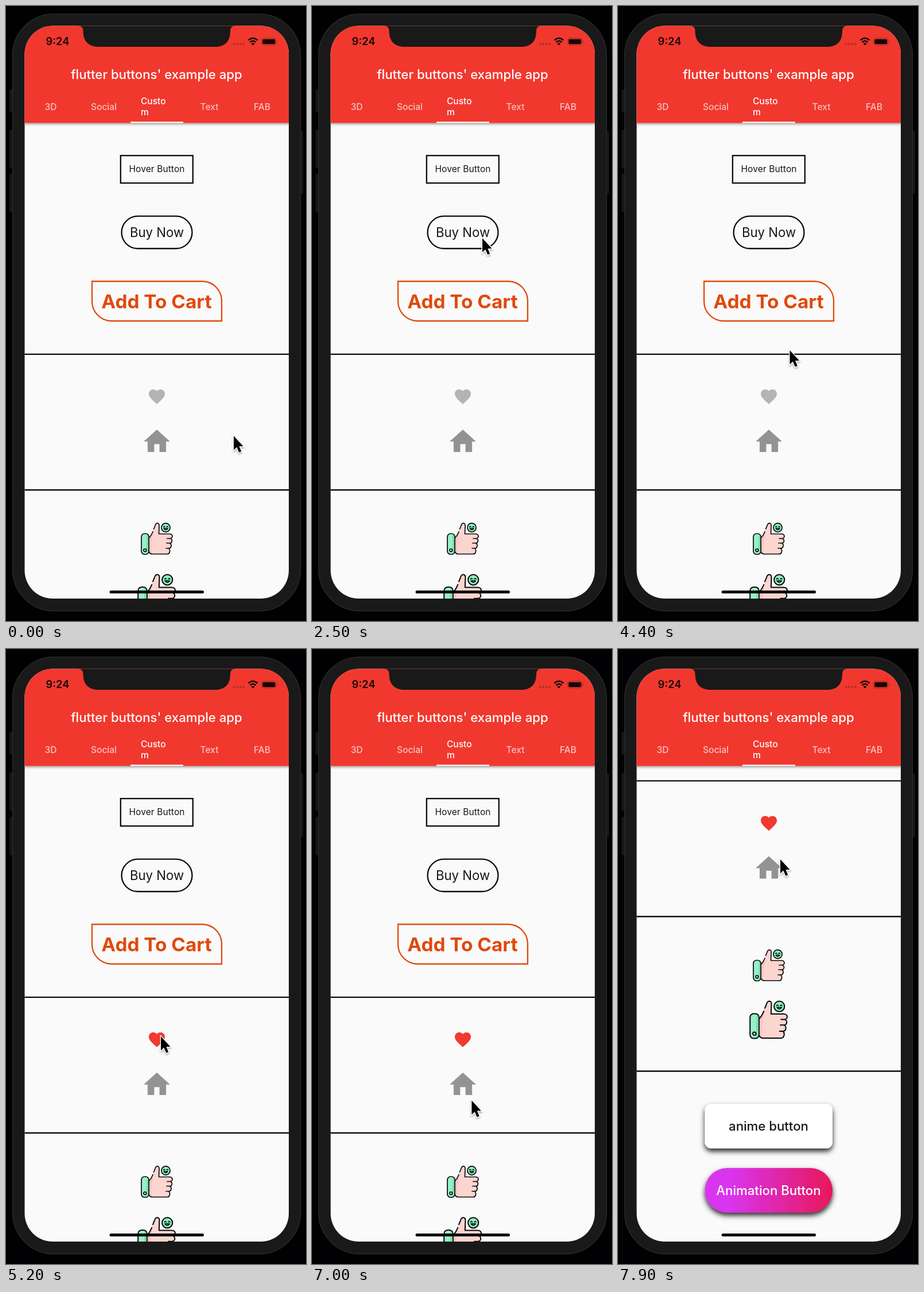
An HTML page for the animation above (8000 ms loop, 523x1070 px).

```html
<!DOCTYPE html>
<html lang="en">
<head>
<meta charset="utf-8">
<title>Button showcase</title>
<style>
  html, body { margin: 0; width: 100%; height: 100%; overflow: hidden; background: #010103; }
  svg { display: block; width: 100%; height: 100%; }
  text { font-family: Inter, Roboto, sans-serif; font-size: 15.5px; text-anchor: middle; }
  .tab { font-weight: 500; fill: #fff; fill-opacity: .7; }
  .medium { font-size: 22.2px; font-weight: 500; }
  .line { fill: none; stroke: #0c0c0e; stroke-width: 2.3; }
</style>
</head>
<body>
<svg viewBox="0 0 523 1070">
  <defs>
    <clipPath id="screen"><rect x="32.5" y="34.5" width="460.5" height="996.5" rx="49"/></clipPath>
    <linearGradient id="pink"><stop offset=".2" stop-color="#d934ee"/><stop offset="1" stop-color="#e71859"/></linearGradient>
    <filter id="lift" x="-20%" y="-30%" width="140%" height="180%">
      <feDropShadow dx="0" dy="5" stdDeviation="5" flood-opacity=".85"/>
    </filter>
    <filter id="barShadow" x="-5%" y="-5%" width="110%" height="115%">
      <feDropShadow dx="0" dy="2" stdDeviation="2" flood-opacity=".4"/>
    </filter>
    <filter id="cursorShadow" x="-50%" y="-30%" width="200%" height="180%">
      <feDropShadow dx="0" dy="2" stdDeviation="1.5" flood-opacity=".35"/>
    </filter>
    <g id="thumb" stroke="#08080a" stroke-width="1.7" stroke-linejoin="round" stroke-linecap="round">
      <path fill="#fdd5cf" stroke="none" d="M14 27C20 22 22 13 25 5.500C26.500 0 32.500 0 32 6L31.500 20H50C56.500 20 56.500 28 50.500 28C56 28.500 55.500 36 50 36C54.500 37 54 45 48.500 45C52 47 51 55 46 55H20Q16 55 14 51Z"/>
      <path fill="#fbc3bc" stroke="none" d="M14 27Q19 23 21 16V24Q18 29 18 54L14 51Z"/>
      <path fill="none" d="M14 27Q18 23.500 21 16M22.500 11.500L25 5.500C26.500 0 32.500 0 32 6L31.500 20H50C56.500 20 56.500 28 50.500 28H46M50.500 28C56 28.500 55.500 36 50 36H45M50 36C54.500 37 54 45 48.500 45H44M48.500 45C52 47 51 55 46 55H20Q16 55 14 51"/>
      <rect x="1" y="19.500" width="13" height="36" rx="5.500" fill="#98f0c6"/>
      <path d="M10.500 21Q13 22 13 26V50Q13 54 9.500 54.500Z" fill="#72ddb0" stroke="none"/>
      <circle cx="7.300" cy="48.500" r="2.300" fill="#e4fff2"/>
      <circle cx="43.500" cy="9" r="7.600" fill="#8af0bd"/>
      <path fill="none" stroke-width="1.400" d="M39.500 8Q40.700 6 42 8M45 8Q46.300 6 47.500 8M40 10.500Q43.500 15 47 10.500Z"/>
    </g>
  </defs>

  <!-- phone body -->
  <g fill="#161617">
    <rect x="6" y="145" width="8" height="39" rx="2"/>
    <rect x="6" y="215" width="8" height="67" rx="2"/>
    <rect x="6" y="292" width="8" height="67" rx="2"/>
    <rect x="510" y="217" width="8" height="110" rx="2"/>
    <rect x="11.500" y="14" width="502" height="1038.500" rx="72" fill="#191919" stroke="#2a2a2a" stroke-width="1.500"/>
  </g>

  <g clip-path="url(#screen)">
    <rect x="32" y="34" width="462" height="998" fill="#fafafa"/>
    <g id="content">
      <rect id="hoverBox" class="line" x="199.800" y="260.200" width="126" height="47.800"/>
      <text x="263" y="289.300" fill="#17171a" letter-spacing=".1">Hover Button</text>
      <rect id="buyBox" class="line" x="201.500" y="365.700" width="123" height="56.300" rx="28.150"/>
      <text x="263" y="402" font-size="22" style="font-size:22.2px" fill="#17171a">Buy Now</text>
      <path id="cartBox" d="M150 479H342A34 34 0 0 1 376 513V548H184A34 34 0 0 1 150 514Z" fill="none" stroke="#e0490c" stroke-width="2.300"/>
      <text id="cartText" x="262.500" y="526" style="font-size:33.3px;font-weight:700">Add To Cart</text>
      <path class="line" d="M32 605.800H494M32 842H494M32 1111H494"/>
      <path id="heart" transform="translate(246.200 662.800) scale(1.4)" d="M12 21.350l-1.450-1.320C5.400 15.360 2 12.280 2 8.500 2 5.420 4.420 3 7.500 3c1.740 0 3.410.810 4.500 2.090C13.090 3.810 14.760 3 16.500 3 19.580 3 22 5.420 22 8.500c0 3.780-3.400 6.860-8.550 11.540z"/>
      <path id="house" transform="translate(235.400 730.100) scale(2.3)" d="M10 20v-6h4v6h5v-8h3L12 3 2 12h3v8z"/>
      <use href="#thumb" x="235" y="898.500"/>
      <use href="#thumb" transform="translate(229 987.500) scale(1.2)"/>
      <rect x="151.500" y="1168" width="222.500" height="77.500" rx="11" fill="#fff" filter="url(#lift)"/>
      <text class="medium" x="262.500" y="1214.800" fill="#17171a">anime button</text>
      <rect x="151.500" y="1279.500" width="222.500" height="77.500" rx="38.700" fill="url(#pink)" filter="url(#lift)"/>
      <text class="medium" x="262.500" y="1326" fill="#fff">Animation Button</text>
    </g>

    <!-- app bar -->
    <rect x="32" y="30" width="462" height="173.500" fill="#f1392f" filter="url(#barShadow)"/>
    <text class="medium" x="262.500" y="126.500" fill="#fff">flutter buttons' example app</text>
    <g class="tab">
      <text x="78" y="181">3D</text>
      <text x="170.500" y="181">Social</text>
      <text x="235" y="171.300" style="text-anchor:start" fill-opacity="1">Custo</text>
      <text x="235" y="190" style="text-anchor:start" fill-opacity="1">m</text>
      <text x="354.500" y="181">Text</text>
      <text x="446.500" y="181">FAB</text>
    </g>
    <rect x="217" y="201.300" width="92" height="2.300" fill="#fff"/>

    <!-- status bar -->
    <path d="M124 34Q134.500 34 134.500 44C134.500 62 145 71 161 71H365C381 71 391 62 391 44Q391 34 401 34Z" fill="#191919"/>
    <text x="90" y="68" style="font-size:18.3px;font-weight:600" fill="#140605">9:24</text>
    <g fill="#b92f28">
      <circle cx="397.500" cy="66" r="2"/><circle cx="403" cy="66" r="2"/>
      <circle cx="408.500" cy="66" r="2"/><circle cx="414" cy="66" r="2"/>
    </g>
    <path d="M422.500 59.500Q430.500 52.500 438.500 59.500M425.500 63Q430.500 58.500 435.500 63" fill="none" stroke="#140605" stroke-width="2.600"/>
    <path d="M427.500 65.500Q430.500 63 433.500 65.500L430.500 68.500Z" fill="#140605"/>
    <rect x="445.500" y="56" width="25.500" height="12" rx="3.500" fill="none" stroke="#a52a23"/>
    <rect x="447.200" y="57.700" width="22.100" height="8.600" rx="2" fill="#140605"/>
    <path d="M472.500 60Q475 62 472.500 64Z" fill="#a52a23"/>
    <rect x="180.500" y="1017" width="164.500" height="5" rx="2.500" fill="#000"/>
  </g>

  <g id="cursor" filter="url(#cursorShadow)">
    <path d="M0 0V24.500L5.300 19.600L9.300 28.800L13.300 27L9.400 18H16.600Z" stroke="#fff" stroke-width="2.600" paint-order="stroke"/>
  </g>
</svg>
<script>
  const LOOP = 8000, STEP = 100, GREY = [147, 147, 147], TINT = [147, 137, 151];
  const el = Object.fromEntries([...document.querySelectorAll("[id]")].map(node => [node.id, node]));

  // Keyframes: [ms, values...]
  const cursorKeys = [
    [0, 397, 748], [800, 292, 286], [1500, 292, 286], [1800, 297, 404], [2500, 297, 404],
    [3100, 329, 524], [4000, 329, 524], [4800, 270, 674], [5500, 270, 674], [6000, 279, 766],
    [6700, 279, 766], [7500, 277, 828], [7600, 277, 828], [7700, 278, 770], [7800, 280, 560], [7900, 283, 366]
  ];
  const scrollKeys = [[7600, 0], [7700, 38], [7800, 248], [7900, 376.5]];
  const hoverKeys = [[900, 0], [1100, 1], [1200, 1], [1400, 0]];
  const buyKeys = [[1900, 0], [2100, 1], [2200, 1], [2400, 0]];
  const tintKeys = [[6100, 0], [6300, 1], [6500, 1], [6800, 0]];

  const ease = p => p * p * (3 - 2 * p);
  const mix = (a, b, p) => a.map((v, i) => v + (b[i] - v) * p);

  function sample(keys, t) {
    const next = keys.findIndex(key => key[0] > t);
    if (next === 0) return keys[0].slice(1);
    if (next < 0) return keys.at(-1).slice(1);
    const [from, to] = [keys[next - 1], keys[next]];
    return mix(from, to, ease((t - from[0]) / (to[0] - from[0]))).slice(1);
  }

  function draw(t) {
    const [x, y] = sample(cursorKeys, t);
    el.cursor.setAttribute("transform", `translate(${x} ${y})`);
    el.content.setAttribute("transform", `translate(0 ${-sample(scrollKeys, t)[0]})`);
    el.hoverBox.style.fill = `rgba(0,0,0,${0.12 * sample(hoverKeys, t)[0]})`;
    el.buyBox.style.fill = `rgba(0,0,0,${0.12 * sample(buyKeys, t)[0]})`;
    const cartPressed = t >= 3200 && t < 3800;
    el.cartBox.style.fill = cartPressed ? "#fde733" : "none";
    el.cartText.style.fill = cartPressed ? "#0c0c0c" : "#e0490c";
    el.heart.style.fill = t >= 5100 ? "#f1392f" : "#b4b4b4";
    el.house.style.fill = `rgb(${mix(GREY, TINT, sample(tintKeys, t)[0])})`;
  }

  function frame() {
    const t = performance.now() % LOOP;
    draw(Math.floor(t / STEP) * STEP);
    requestAnimationFrame(frame);
  }
  frame();
</script>
</body>
</html>
```
